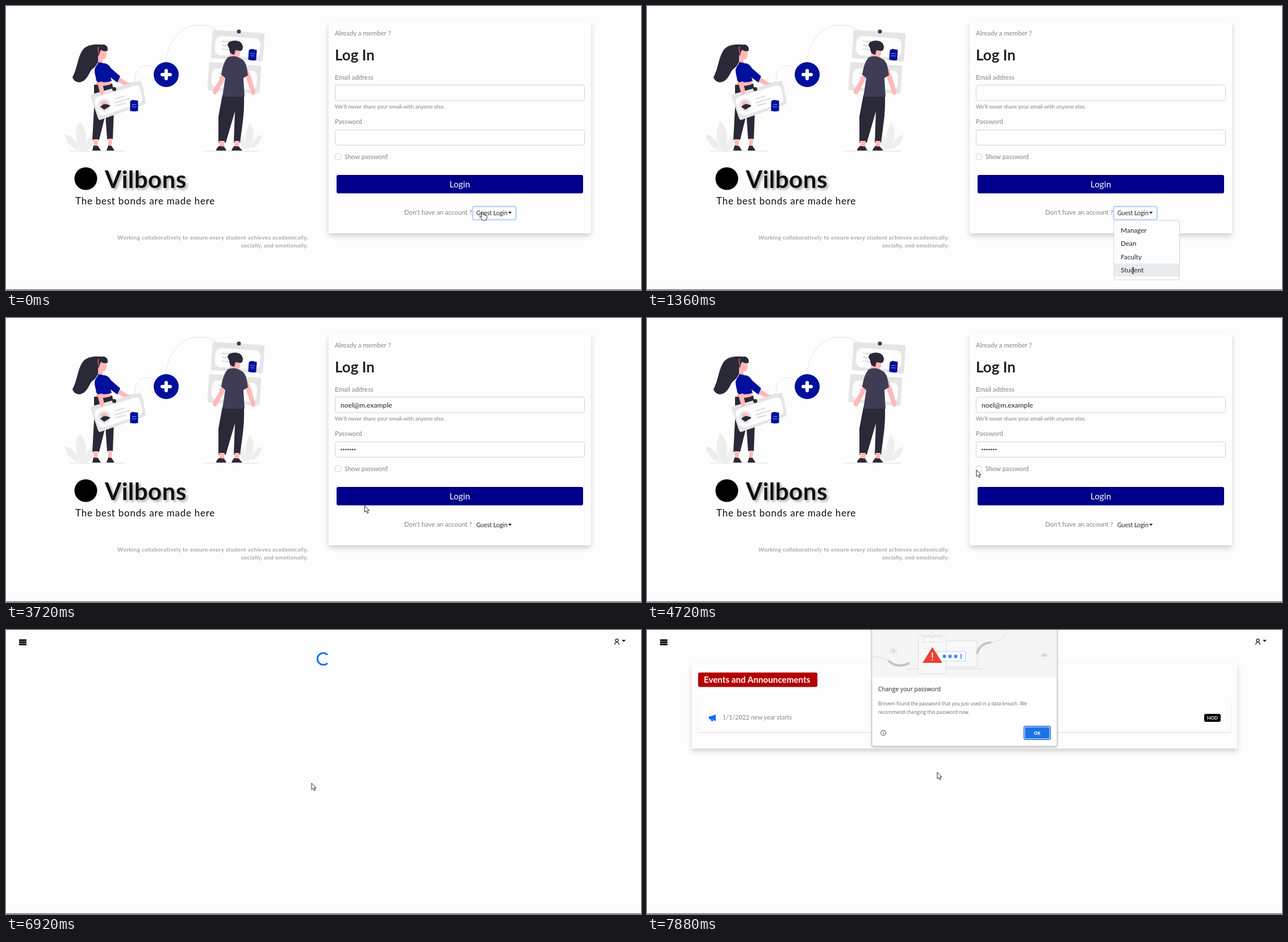
These frames come from a looping animation (1118x501 px, 8 s). An HTML page:

```html
<!DOCTYPE html>
<html lang="en">
<head>
<meta charset="utf-8">
<title>Login walkthrough</title>
<style>
html, body { margin: 0; width: 100%; height: 100%; overflow: hidden; background: #fdfdfd; }
svg { display: block; width: 1118px; height: 501px; font-family: Lato, "Open Sans", sans-serif; }
.grey { fill: #858585; font-size: 11.4px; }
.white { fill: #fff; }
.bold { font-weight: 700; }
.mid { text-anchor: middle; }
.note { fill: #a9a9a9; font-size: 10px; letter-spacing: .3px; text-anchor: end; }
.field { fill: #fdfdfd; stroke: #cfd4da; }
.card { fill: #fdfdfd; filter: drop-shadow(0 5px 5px #0000002b); }
.ring { fill: #fdfdfd; stroke: #bdd7fd; stroke-width: 2.6; }
.ink { fill: #2a2938; }
.skin { fill: #ffb8b8; }
.blue { fill: #00109c; }
.paper { fill: #e5e5e5; }
.leaf { fill: #eee; }
.line { fill: none; stroke: #dcdcdc; }
.dots { fill: none; stroke: #c9c9c9; stroke-dasharray: 1.5 1.5; }
.dialog { font-family: "Open Sans", "Noto Sans", sans-serif; }
.dialog .body { fill: #666a6f; font-size: 8.3px; }
.cursor { fill: #fff; stroke: #111; stroke-width: .9; stroke-linejoin: round; }
</style>
</head>
<body>
<svg viewBox="0 0 1118 501">
<defs>
  <g id="tag">
    <path class="blue" d="M-7-7Q-5-11 0-10L7-9V9Q0 11-7 9Z"/>
    <path d="M-4-2H4M-4 2H4" stroke="#8f98dd" stroke-width="1.1"/>
  </g>
  <g id="sheet">
    <rect class="paper" x="-46" y="-25" width="92" height="50" rx="4"/>
    <rect x="-40" y="-15" width="80" height="34" rx="11" fill="#fdfdfd"/>
    <path class="line" stroke-width="2.2" d="M-28-6H-6M-28 1H12M-28 8H8"/>
  </g>
  <g id="plant" class="leaf">
    <path d="M-5 25C-20 20-28 10-31-3C-17-2-8 9-5 25ZM-2 25C-15 5-13-14-4-27C9-10 10 8 3 25ZM3 25C7 8 14-2 22-6C24 8 17 20 9 25Z"/>
  </g>
</defs>

<g id="login">
  <!-- scene -->
  <use href="#plant" x="134" y="230"/>
  <use href="#plant" transform="translate(427 230) scale(-.78 .9)"/>
  <path class="line" d="M112 256H212M347 256H447" stroke="#c4c4c4"/>
  <path class="dots" d="M282 99C283 62 309 31 344 34Q360 35 373 44M227 134C226 108 245 98 261 110"/>
  <circle class="blue" cx="282" cy="121" r="22"/>
  <path d="M282 114V128M275 121H289" stroke="#fff" stroke-width="6" stroke-linecap="round"/>

  <!-- woman -->
  <path class="ink" d="M155 139L187 137Q192 158 190 184L188 235H178L175 192L164 236H152L155 180Z"/>
  <path class="skin" d="M154 235H162L161 248H155ZM180 234H187L186 248H180Z"/>
  <path class="ink" d="M154 246L162 247L167 255H152ZM180 246L186 247L191 255H177Z"/>
  <path class="ink" d="M173 69C156 66 141 68 134 79C126 92 126 108 117 126C121 136 132 137 139 130C148 121 147 113 155 109C164 101 166 84 173 76Z"/>
  <path class="skin" d="M164 76Q166 70 173 72Q179 78 177 87Q176 95 170 94L171 105L162 103V88ZM160 130L185 128L186 137Q172 144 158 138Z"/>
  <path class="ink" d="M161 77Q163 67 173 68Q180 70 179 79Q171 81 167 77L163 89Z"/>
  <path d="M163 72Q161 78 164 84" fill="none" stroke="#ff5470" stroke-width="1.5"/>
  <path class="skin" d="M195 123L216 136L229 134L242 144L240 150L228 143L214 143L193 132Z"/>
  <path class="blue" d="M163 99L172 101Q180 101 185 110L201 124L196 135L184 126L186 132Q173 137 159 132L156 112Z"/>
  <path class="blue" d="M161 103Q154 110 157 122L162 136L170 133L168 115Z"/>
  <path class="paper" d="M150 156L235 132Q238 132 239 135L246 169Q246 172 243 174L166 201Q163 201 162 198L149 160Z"/>
  <path d="M162 160L229 140Q235 140 237 148L240 161Q241 169 234 172L173 193Q166 194 162 186L157 172Q155 163 162 160Z" fill="#fdfdfd"/>
  <circle class="paper" cx="173" cy="175" r="11"/>
  <path class="skin" d="M168 170Q174 165 178 171L179 176H169Z"/>
  <path class="ink" d="M166 178Q173 169 184 176L173 183Z"/>
  <path class="line" stroke-width="2.2" d="M192 164L208 159M191 171L217 163M193 176L211 171"/>
  <use href="#tag" x="225.500" y="176"/>
  <path class="skin" d="M161 135L169 133L173 151Q170 159 166 156Z"/>
  <circle class="ink" cx="190.500" cy="146.500" r="3.600"/>

  <!-- man -->
  <use href="#sheet" transform="translate(402 127) rotate(4)"/>
  <use href="#sheet" transform="translate(408 70) rotate(4)"/>
  <use href="#tag" transform="translate(434 86) rotate(4)"/>
  <circle cx="410" cy="45" r="3.600" fill="#3f3d56"/>
  <path class="ink" d="M381 157L419 156Q420 183 416 211L412 241H401L403 186L387 241H374L374 195Z"/>
  <path class="skin" d="M375 238H385L384 250H376ZM402 238H411L410 250H403Z"/>
  <path class="ink" d="M375 247L384 248L388 255H370Q370 251 375 247ZM402 247L410 248L416 255H397Q398 251 402 247Z"/>
  <path class="skin" d="M382 114L389 120L379 140L370 156Q364 157 364 149L374 133ZM417 112L425 109L433 130L439 152Q437 160 432 155L426 136ZM394 76L411 78Q415 86 408 91L407 96L394 94Z"/>
  <path class="ink" d="M390 69Q391 61 404 61Q417 62 417 74Q416 80 411 79L404 78L402 86Q393 85 393 75Z"/>
  <path d="M391 90Q403 86 412 92Q422 96 424 110L426 122L418 127L420 160H381L386 127L379 121Q382 99 391 90Z" fill="#3f3d56"/>

  <!-- title -->
  <circle cx="140.500" cy="304.500" r="20"/>
  <text class="bold" x="174" y="321" font-size="42" letter-spacing=".5" fill="#111" style="filter:drop-shadow(3px 3px 2px #0005)">Vilbons</text>
  <text x="122" y="350" font-size="17" letter-spacing=".75" fill="#111">The best bonds are made here</text>
  <text class="note bold" x="532" y="411.500">Working collaboratively to ensure every student achieves academically,</text>
  <text class="note bold" x="532" y="426">socially, and emotionally.</text>

  <!-- form -->
  <rect class="card" x="568" y="27" width="462" height="374" rx="3"/>
  <text class="grey" x="579" y="51.500">Already a member ?</text>
  <text class="bold" x="579" y="96" font-size="26" fill="#212529">Log In</text>
  <text class="grey" x="579" y="129.500">Email address</text>
  <rect class="field" x="579.500" y="139.500" width="439" height="27.500" rx="3"/>
  <text class="grey" x="579" y="180.500" style="font-size:9.650px">We'll never share your email with anyone else.</text>
  <text class="grey" x="579" y="208">Password</text>
  <rect class="field" x="579.500" y="218.500" width="439" height="27" rx="3"/>
  <g id="filled" fill="#212529" font-size="12.200">
    <text x="589" y="157.500">noel@m.example</text>
    <path id="masked" d="M590.500 232H615" stroke="#212529" stroke-width="2.500" stroke-linecap="round" stroke-dasharray="0 3.950"/>
    <text id="plain" x="589" y="236">noel123</text>
  </g>
  <rect id="boxRing" class="ring" x="578.500" y="259.500" width="13" height="13" rx="4"/>
  <rect id="box" class="field" x="579.500" y="261" width="10.500" height="10" rx="2.500"/>
  <path id="tick" d="M582 266L584.500 268.500L588 263.500" fill="none" stroke="#fff" stroke-width="1.500"/>
  <text class="grey" x="596" y="270" style="font-size:11.100px">Show password</text>
  <rect x="582" y="298" width="434" height="32.500" rx="3" fill="#00008b"/>
  <text class="white mid" x="799" y="319.500" font-size="15.400">Login</text>
  <text class="grey" x="701" y="368">Don't have an account ?</text>
  <rect id="guestRing" class="ring" x="821.500" y="353.500" width="76.500" height="23.500" rx="3"/>
  <text x="828" y="368.500" font-size="10.500" fill="#212529">Guest Login</text>
  <path d="M884 363H890.500L887.250 366.500Z" fill="#212529"/>
  <g id="menu" font-size="11.800" fill="#212529">
    <rect x="822" y="378" width="115.500" height="105" rx="3" fill="#fdfdfd" stroke="#d2d2d2"/>
    <rect id="hover" x="822.500" width="114.500" height="23.200" fill="#e9ecef"/>
    <text x="834" y="400">Manager</text>
    <text x="834" y="423">Dean</text>
    <text x="834" y="446.500">Faculty</text>
    <text x="834" y="469.500">Student</text>
  </g>
</g>

<g id="home">
  <path d="M23 18H36M23 21.750H36M23 25.500H36" stroke="#000" stroke-width="2.800"/>
  <g fill="none" stroke="#111" stroke-width="1.200">
    <circle cx="1075.500" cy="18.300" r="2.500"/>
    <path d="M1071.800 26Q1072 21.500 1075.500 21.500T1079.200 26"/>
  </g>
  <path d="M1084 17.500H1091L1087.500 21Z"/>
  <path id="spinner" d="M566 43.600A10.400 10.400 0 1 0 566 58.400" fill="none" stroke="#0d6efd" stroke-width="2.900"/>
  <g id="events">
    <rect class="card" x="79" y="60" width="960" height="149" rx="3"/>
    <rect x="90" y="75" width="210" height="25.500" rx="3" fill="#b50000"/>
    <text class="white bold" x="100" y="93" font-size="15.200">Events and Announcements</text>
    <rect x="90" y="127" width="938" height="53" rx="3" fill="#fdfdfd" style="filter:drop-shadow(0 1px 1px #0002)"/>
    <path d="M109 152.500L113 152L121 149V161L115.500 158L117 161H113.500L112 157.500L109 157Z" fill="#0d6efd"/>
    <text class="grey" x="133" y="158" style="font-size:10.800px">1/1/2022 new year starts</text>
    <rect x="981" y="148" width="29" height="14" rx="3"/>
    <text class="white bold mid" x="995.500" y="158" font-size="8.200">HOD</text>
  </g>
  <g id="dialog" class="dialog">
    <path d="M396-10H722V202Q722 205 719 205H399Q396 205 396 202Z" fill="#fff" stroke="#c4c4c4" style="filter:drop-shadow(0 1px 1.500px #0005)"/>
    <rect x="396.500" width="325" height="83.500" fill="#f5f5f6"/>
    <g class="line">
      <path d="M455 68.500H591M396 47Q412 46 425 54M604 22Q630 20 633 0"/>
      <path d="M527 19H581V65H527" fill="#f8f8f9"/>
      <rect x="477.500" y="10" width="49" height="67" rx="4" fill="#f8f8f9"/>
      <path d="M486 21V15Q486 12 490 12H515Q519 12 519 15V21Z"/>
      <circle cx="502.500" cy="9.500" r="4.500"/>
      <path d="M425 54Q441 69 462 58M581 42Q586 23 606 22" stroke="#c2c3c7" stroke-width="4"/>
      <path d="M434 30V43M428 33L440 40M440 33L428 40" stroke-width="2"/>
    </g>
    <path d="M694 47Q694 41 699.500 41T705 47Z" fill="#d9d9dc"/>
    <rect x="510" y="38" width="51" height="17" fill="#fff" stroke="#b5cffa"/>
    <g stroke="#1a73e8" stroke-width="1.500">
      <path id="star" d="M523.500 43V50M520.500 44.750L526.500 48.250M526.500 44.750L520.500 48.250"/>
      <use href="#star" x="10"/><use href="#star" x="20"/>
      <path d="M553 42V51"/>
    </g>
    <path d="M502.500 30L520 58H485Z" fill="#e94235"/>
    <path d="M502.500 40V49M502.500 51.500V53.500" stroke="#fff" stroke-width="2"/>
    <text x="407" y="107.500" font-size="10.300" fill="#202124">Change your password</text>
    <text class="body" x="407" y="133">Brovem found the password that you just used in a data breach. We</text>
    <text class="body" x="407" y="148">recommend changing this password now.</text>
    <circle cx="416.200" cy="181.500" r="4.500" fill="none" stroke="#444"/>
    <path d="M416.200 178.800V180M416.200 181V184.200" stroke="#444"/>
    <rect x="663.700" y="169.700" width="46.600" height="23.600" rx="3" fill="#fff" stroke="#1967c8" stroke-width="1.500"/>
    <rect x="665.500" y="171.500" width="43" height="20" rx="2" fill="#1a73e8"/>
    <text class="white bold mid" x="687" y="184.500" font-size="8">OK</text>
  </g>
</g>

<g id="cursor" class="cursor">
  <path id="arrow" d="M0 0V11.500L2.700 9.200L4.600 13.500L6.500 12.700L4.700 8.500H8Z"/>
  <path id="hand" d="M-1.500 1Q0-1 1.200 1V5L7 6.500Q8 7 8 9Q7.500 12 6 15H-.500Q-3 11-5 9Q-5-  7-3 8L-1.500 9.500Z"/>
  <path id="beam" d="M-2-5H2M0-5V5M-2 5H2"/>
</g>
<rect y="500" width="1118" height="1" fill="#555"/>
</svg>
<script>
const $ = id => document.getElementById(id);
$("hand").setAttribute("d", "M-1.5 1Q0-1 1.2 1V5L7 6.5Q8 7 8 9Q7.500 12 6 15H-.5Q-3 11-5 9Q-5 7-3 8L-1.5 9.5Z");

const LOOP = 8000, OPEN = 400, PICK = 1960, CHECK = 5280, UNCHECK = 5680;
const HOME = 6900, DIALOG = 7440, EVENTS = 7840;

// pointer stops: time, x, y
const stops = [
  [0, 839, 363], [480, 839, 363], [1200, 855.5, 467], [2000, 855.5, 467],
  [2640, 676, 292], [2760, 676, 292], [3400, 640, 334], [4240, 614, 325],
  [4700, 580, 268], [5640, 582, 266], [6040, 616, 336], [6160, 616, 336],
  [6360, 620, 318], [6560, 620, 318], [6900, 538, 270], [6960, 538, 270],
  [7440, 511, 251], [LOOP, 511, 251]
];

const show = (id, on) => $(id).style.display = on ? "" : "none";
const ease = p => p * p * (3 - 2 * p);

function pointer(t) {
  const i = stops.findIndex(s => s[0] > t);
  const [t0, x0, y0] = stops[i - 1], [t1, x1, y1] = stops[i];
  const p = ease((t - t0) / (t1 - t0));
  return [x0 + (x1 - x0) * p, y0 + (y1 - y0) * p];
}

function draw(t) {
  const [x, y] = pointer(t);
  const inside = (l, top, r, b) => x > l && x < r && y > top && y < b;
  const home = t >= HOME, menu = t >= OPEN && t < PICK;
  const checked = t >= CHECK && t < UNCHECK;

  show("login", !home);
  show("home", home);
  show("guestRing", t < PICK);
  show("menu", menu);
  show("filled", t >= PICK);
  show("masked", !checked);
  show("plain", checked);
  show("boxRing", t >= CHECK);
  show("tick", checked);
  $("box").style.fill = $("box").style.stroke = checked ? "#0d6efd" : "";

  const row = Math.floor((y - 384.5) / 23.2);
  const onItem = menu && row >= 0 && row < 4;
  show("hover", onItem);
  $("hover").setAttribute("y", 384.5 + 23.2 * row);

  show("events", t >= EVENTS);
  show("dialog", t >= DIALOG);
  $("dialog").style.opacity = Math.min(1, (t - DIALOG) / 200);
  show("spinner", t < EVENTS);
  $("spinner").setAttribute("transform", `rotate(${(t - 6920) / 750 * 360} 558.5 51)`);

  const hand = !home && (inside(821, 353, 898, 377) || inside(582, 298, 1016, 330));
  show("hand", hand);
  show("beam", onItem);
  show("arrow", !hand && !onItem);
  $("cursor").setAttribute("transform", `translate(${x} ${y})`);
}

const start = performance.now();
function tick() {
  draw((performance.now() - start) % LOOP);
  requestAnimationFrame(tick);
}
tick();
</script>
</body>
</html>
```
